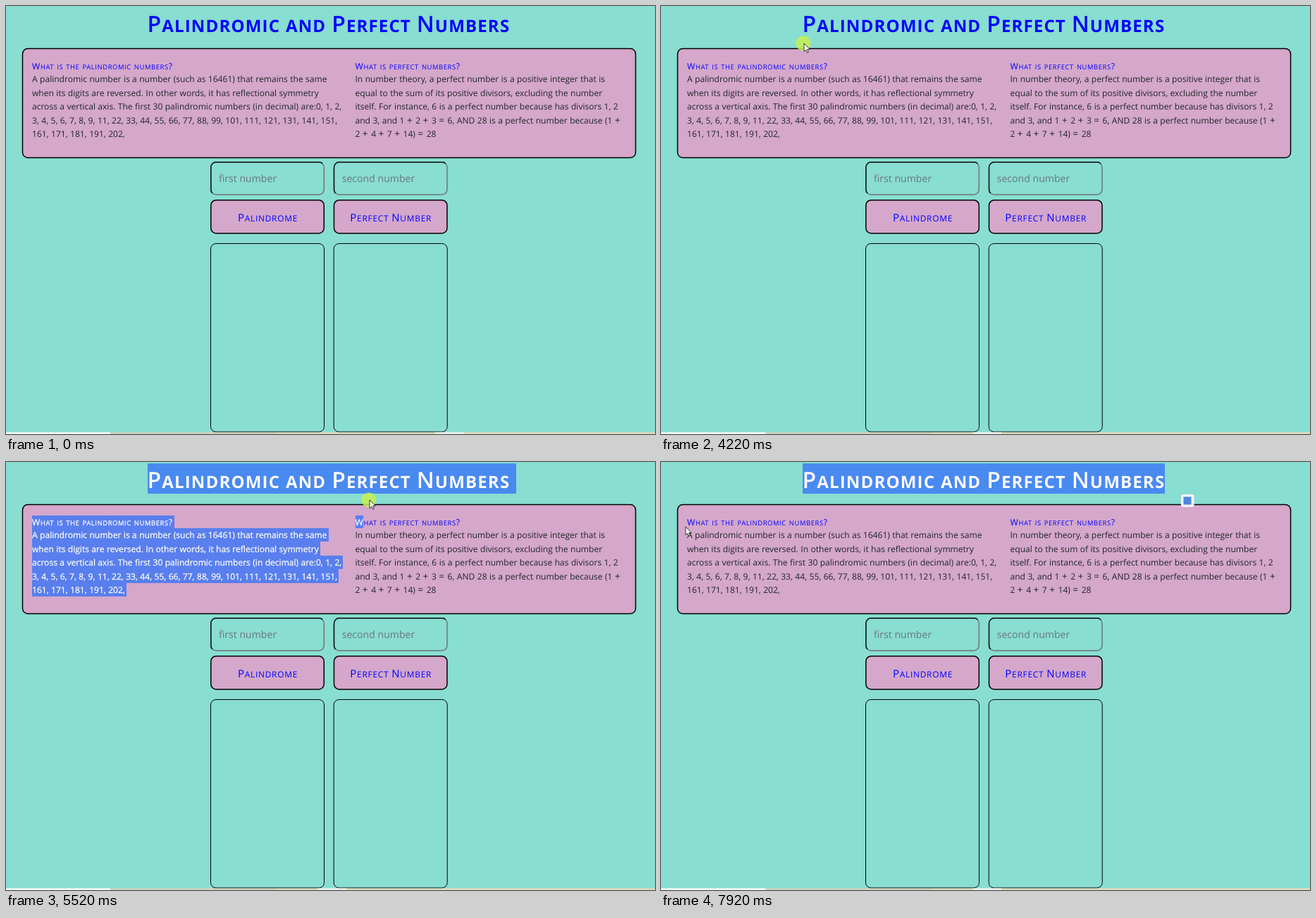
An HTML page for the animation above (8000 ms loop, 921 by 608 pixels).

```html
<!DOCTYPE html>
<html lang="en">
<head>
<meta charset="utf-8">
<title>Palindromic and Perfect Numbers</title>
<style>
  html, body { margin: 0; width: 100%; height: 100%; overflow: hidden; background: #88ded0; }
  svg { display: block; width: 921px; height: 608px; }
  text {
    font-family: "Open Sans", "Noto Sans", sans-serif;
    white-space: pre;
    text-rendering: geometricPrecision;
  }
  .title { font-weight: 600; letter-spacing: 1.1px; word-spacing: .5px; fill: #0000ff; }
  .title tspan { font-weight: 700; }
  .head { letter-spacing: .6px; word-spacing: 1.1px; fill: #0000ff; }
  .label { letter-spacing: .75px; fill: #0000ff; text-anchor: middle; }
  .body { font-size: 12.05px; word-spacing: .3px; fill: #212529; }
  .sign { font-size: 13.5px; letter-spacing: 1.2px; }
  .hint { font-size: 14.1px; fill: #6c757d; }
  .picked text { fill: #fff; }
  .picked .body, .picked .head { stroke: #fff; stroke-width: .3px; }
</style>
</head>
<body>
<svg id="stage" viewBox="0 0 921 608"></svg>
<script>
const LOOP = 8000, START = 1280, TICK_FROM = 1270, TICK = 100.75;
const PINK = '#d4a7cb';

const left = `A palindromic number is a number (such as 16461) that remains the same
when its digits are reversed. In other words, it has reflectional symmetry
across a vertical axis. The first 30 palindromic numbers (in decimal) are:0, 1, 2,
3, 4, 5, 6, 7, 8, 9, 11, 22, 33, 44, 55, 66, 77, 88, 99, 101, 111, 121, 131, 141, 151,
161, 171, 181, 191, 202,`;
const right = `In number theory, a perfect number is a positive integer that is
equal to the sum of its positive divisors, excluding the number
itself. For instance, 6 is a perfect number because has divisors 1, 2
and 3, and 1 + 2 + 3 = 6, AND 28 is a perfect number because (1 +
2 + 4 + 7 + 14) = 28`;

// Small capitals: lowercase runs become smaller capitals.
const caps = (str, size) => str.replace(/[a-z ]+/g,
  run => `<tspan font-size="${size}">${run.toUpperCase()}</tspan>`);

const text = (cls, x, y, inner, size) =>
  `<text class="${cls}" x="${x}" y="${y}"${size ? ` font-size="${size}"` : ''}>${inner}</text>`;

const column = (x, heading, lines) =>
  text('head', x, 90, caps(heading, 9.4), 12.2) +
  lines.split('\n').map((line, i) => text('body', x, 108.4 + i * 19.5,
    line.replace(/[+=]/g, '<tspan class="sign">$&</tspan>'))).join('');

const box = (x, y, w, h, fill, stroke, width) =>
  `<rect x="${x}" y="${y}" width="${w}" height="${h}" rx="7.5" fill="${fill}" stroke="${stroke}" stroke-width="${width}"/>`;

// Text field: grey frame with a dark top and left side.
const inset = (x, y, w, h) => {
  const r = 7.5, arc = `A${r} ${r} 0 0 1 `;
  return box(x, y, w, h, 'none', '#6b7774', 1.5) +
    `<path fill="none" stroke="#101817" stroke-width="1.5" d="M${x + 2} ${y + h - 2}${arc}${x} ${y + h - r}` +
    `V${y + r}${arc}${x + r} ${y}H${x + w - r}${arc}${x + w - 2} ${y + 2}"/>`;
};

const fields = (x, hint, label) =>
  inset(x + .3, 221.8, 160.5, 46.2) +
  text('hint', x + 11.5, 250, hint) +
  box(x + .3, 275.7, 160.5, 47.3, PINK, '#000', 1.5) +
  text('label', x + 81, 306, caps(label, 11.9), 15) +
  box(x, 337.5, 161, 267.5, 'none', '#000', 1);

const prose =
  text('title', 200.6, 37.3, caps('Palindromic and Perfect Numbers', 24.1), 31.9) +
  column(37, 'What is the palindromic numbers?', left) +
  column(495.5, 'What is perfect numbers?', right);

const strip = (x, w, fill, id = '') =>
  `<rect ${id} x="${x}" y="605.6" width="${w}" height="3" fill="${fill}"/>`;

const stage = document.getElementById('stage');
stage.innerHTML = `
  <defs><clipPath id="clip"><path id="clipShape"/></clipPath></defs>
  <rect width="921" height="608" fill="#88ded0"/>
  ${box(23.5, 60.5, 870, 155, PINK, '#000', 1.5)}
  ${fields(290.5, 'first number', 'Palindrome')}
  ${fields(465.2, 'second number', 'Perfect Number')}
  ${strip(0, 148, '#fbfdfc')}${strip(148, 237, '#d5d3bb')}${strip(385, 536, '#e4dcbc')}
  ${strip(609, 41, '#eef5ee', 'id="gap"')}
  ${prose}
  <path id="shade" fill="rgba(56,114,249,.78)" shape-rendering="crispEdges"/>
  <g class="picked" clip-path="url(#clip)">${prose}</g>
  <g id="popup">
    <rect x="738" y="46" width="18.5" height="18" rx="2.5" fill="#f3f3f6"/>
    <rect x="741.5" y="49.5" width="11" height="11" fill="#4f86e0"/>
  </g>
  <g id="pointer">
    <circle id="press" cx="-1" r="10.5" fill="#c8ee50" fill-opacity=".85"/>
    <path id="beam" d="M-3-5.5h2.2L0-4.8.8-5.5H3M0-5V5M-3 5.5h2.2L0 4.8l.8.7H3" fill="none" stroke="#34435a" stroke-opacity=".85"/>
    <path id="arrow" d="M0 0V11.6L2.7 9.2 4.5 13.2 6.3 12.4 4.6 8.5H8.2Z" fill="#fff" stroke="#222" stroke-width=".9"/>
  </g>`;

const $ = id => document.getElementById(id);
const show = (id, on) => $(id).setAttribute('visibility', on ? 'visible' : 'hidden');
const title = stage.querySelector('.title');
const [headL, headR] = stage.querySelectorAll('.head');
const rows = [...stage.querySelectorAll('.body')].slice(0, left.split('\n').length);

// Pointer moves: first tick, last tick, goal x, goal y, bend
const moves = [
  [0, 7, 224, 88, 0], [7, 8, 220, 36, 0], [8, 15, 207, 32, -18],
  [19, 22, 219, 34, 0], [23, 26, 283, 35, 0], [27, 29, 203, 53, 0],
  [31, 36, 241, 33, 0], [36, 42, 516, 54, 8], [42, 49, 748, 31, 6],
  [50, 59, 92, 99, 45], [59, 63, 41, 99, 0], [64, 66, 35, 92, 0]
];

function pointerAt(n) {
  let x = 901, y = 256;
  for (const [from, to, gx, gy, bend] of moves) {
    const k = Math.min(1, Math.max(0, (n - from) / (to - from)));
    x += (gx - x) * k;
    y += (gy - y) * k + bend * Math.sin(Math.PI * k);
  }
  return [x, y];
}

const endOf = (el, i = el.getNumberOfChars() - 1) => el.getEndPositionOfChar(i).x;

// Nearest letter edge in the title.
function snap(x) {
  let best = 201;
  for (let i = 0; i < title.getNumberOfChars(); i++) {
    const edge = endOf(title, i);
    if (Math.abs(edge - x) < Math.abs(best - x)) best = edge;
  }
  return Math.round(best);
}

function bar(x1, y1, x2, y2) {
  [x1, y1, x2, y2] = [x1, y1, x2, y2].map(Math.round);
  return x2 > x1 ? `M${x1} ${y1}H${x2}V${y2}H${x1}Z` : '';
}
const titleBar = (x1, x2) => bar(x1, 2, x2, 45);

function selection(n, x, y) {
  if (n === 24 || n === 25) return titleBar(snap(222), snap(x));
  if (n < 33) return '';
  if (n >= 49) return titleBar(201, 715);
  if (n <= 40 || y < 47) return titleBar(201, snap(x));
  return titleBar(201, 724) +
    bar(37, 76, endOf(headL) + 2, 94) + bar(496, 76, endOf(headR, 0), 94) +
    rows.map((row, i) => bar(37, 94 + 19.4 * i, endOf(row) + 2, 113.4 + 19.4 * i)).join('');
}

const inside = (x, y, x1, y1, x2, y2) => x >= x1 && x <= x2 && y >= y1 && y <= y2;
const overText = (x, y) =>
  inside(x, y, 201, 2, 715, 45) || inside(x, y, 37, 76, 476, 191) || inside(x, y, 496, 76, 875, 191);

let last;
function draw(t) {
  const n = t < START ? -1 : Math.floor((t - TICK_FROM) / TICK);
  if (n === last) return;
  last = n;
  const [x, y] = pointerAt(n), beam = overText(x, y), on = n >= 0;
  $('pointer').setAttribute('transform', `translate(${x} ${y})`);
  show('beam', on && beam);
  show('arrow', on && !beam);
  show('press', n >= 20 && n < 51);
  show('popup', n >= 52);
  $('gap').setAttribute('x', n < 20 ? 609 : 442.5);
  const d = selection(n, x, y);
  $('shade').setAttribute('d', d);
  $('clipShape').setAttribute('d', d);
}

const begin = performance.now();
function frame() {
  draw((performance.now() - begin) % LOOP);
  requestAnimationFrame(frame);
}
frame();
</script>
</body>
</html>
```
